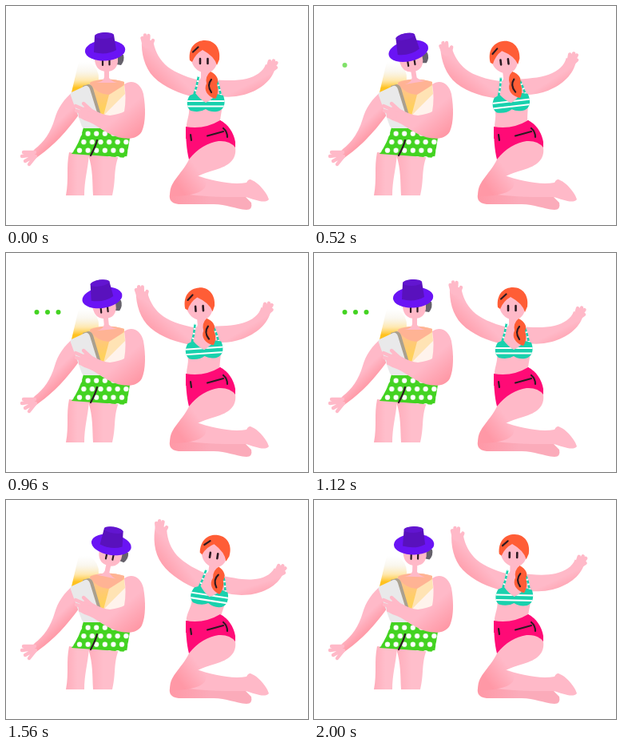
Recreate the animation shown at these times as an HTML page. Size 378 px wide and 274 px high, loop 2040 ms.

```html
<!DOCTYPE html>
<html lang="en">
<head>
<meta charset="utf-8">
<title>Beach dance</title>
<style>
  html, body { margin: 0; width: 100%; height: 100%; overflow: hidden; background: #fff; }
  svg { display: block; width: 378px; height: 274px; }
  .line { fill: none; stroke: #2b1a22; stroke-width: 2.2; stroke-linecap: round; stroke-linejoin: round; }
  .finger { fill: none; stroke: #ffb9c8; stroke-width: 4.4; stroke-linecap: round; stroke-linejoin: round; }
  .skin { fill: #ffb9c8; }
</style>
</head>
<body>
<svg viewBox="0 0 378 274">
  <defs>
    <linearGradient id="downRight" x1="0" y1="0" x2="1" y2="1">
      <stop offset=".6" stop-color="#ffb9c8"/><stop offset="1" stop-color="#ff8f9c"/>
    </linearGradient>
    <linearGradient id="downLeft" x1="1" y1="0" x2="0" y2="1">
      <stop offset=".5" stop-color="#ffb9c8"/><stop offset=".85" stop-color="#ff929f"/>
    </linearGradient>
    <linearGradient id="thigh" x1="1" y1="0" x2="0" y2=".6">
      <stop offset=".65" stop-color="#ffb9c8"/><stop offset="1" stop-color="#ff98a6"/>
    </linearGradient>
    <linearGradient id="arm" gradientUnits="userSpaceOnUse" x1="58" y1="135" x2="78" y2="156">
      <stop offset=".4" stop-color="#ffb9c8"/><stop offset="1" stop-color="#ff98a5"/>
    </linearGradient>
    <linearGradient id="leg">
      <stop offset="0" stop-color="#ffadbb"/><stop offset=".5" stop-color="#ffbecb"/>
    </linearGradient>
    <linearGradient id="shin">
      <stop offset="0" stop-color="#ff98a6"/><stop offset=".5" stop-color="#fbabba"/>
    </linearGradient>
    <linearGradient id="glow" x1="0" y1="1" x2="0" y2="0">
      <stop offset=".15" stop-color="#ffc21f"/><stop offset=".4" stop-color="#ffd878" stop-opacity=".6"/>
      <stop offset=".7" stop-color="#eee4c8" stop-opacity=".3"/><stop offset="1" stop-color="#eee8d8" stop-opacity="0"/>
    </linearGradient>
    <linearGradient id="chest" x1="0" y1="0" x2=".25" y2="1">
      <stop offset="0" stop-color="#ffb3a0"/><stop offset=".35" stop-color="#ffc488"/><stop offset=".85" stop-color="#ffd15c"/>
    </linearGradient>
    <pattern id="spots" width="10.6" height="21" patternUnits="userSpaceOnUse" patternTransform="translate(92 165)">
      <path fill="#43d321" d="M0 0h11v21H0z"/>
      <g fill="#fff"><circle cx="5.300" cy="5.200" r="3.100"/><circle cx="0" cy="15.700" r="3.100"/><circle cx="10.600" cy="15.700" r="3.100"/></g>
    </pattern>
    <clipPath id="top">
      <path d="M237 109Q243 117 250 121Q257 118 264 110L272 112C276 123 272 131 264 132Q256 133 250 129Q242 134 231 131C225 126 226 118 230 112Z"/>
    </clipPath>
  </defs>

  <g id="dots" fill="#43d321">
    <circle cx="38.5" cy="74" r="3"/><circle cx="52" cy="74" r="3"/><circle cx="65.5" cy="74" r="3"/>
  </g>

  <!-- man -->
  <path fill="url(#glow)" d="M91 70H105Q117 79 116 92L108 108H82Z"/>
  <path fill="url(#leg)" d="M79 183C75 203 79 215 75 237H98C98 219 102 206 104 186Z"/>
  <path fill="url(#leg)" d="M103 186C109 205 108 220 109 237H133C138 216 134 207 141 187Z"/>
  <path fill="#fff3ec" d="M108 95L148 96L152 138L118 155L92 140L88 110Z"/>
  <path fill="url(#chest)" d="M106 95Q126 88 148 95Q148 104 146 110L121 138H112L98 110Z"/>
  <path fill="#ffb394" d="M105 96Q126 88 148 95Q144 108 129 111Q113 110 105 96Z"/>
  <path fill="#ffe3b4" d="M129 111L148 99L149 110L122 137Z"/>
  <path fill="url(#arm)" d="M84 107C73 116 65 127 61 141C56 158 47 171 36 179L29 187L34 193L42 187C60 174 76 157 92 135L101 112Z"/>
  <path class="finger" d="M36 183L22 183M34 186L20 188M35 188L24 194M37 188L29 198"/>
  <path fill="url(#spots)" d="M97 152L118 153Q135 164 155 165L151 190Q126 188 82 185Q92 172 97 152Z"/>
  <path class="line" d="M114 168Q112 176 106 187"/>
  <path fill="#aaa08f" d="M96 100L103 98Q107 98 109 103L121 143Q122 150 115 152L104 152Z"/>
  <path fill="#e9e9ea" d="M82 108L99 100Q103 99 105 104L118 146Q119 152 113 153L98 153Q95 152 94 148L81 112Q80 109 82 108Z"/>
  <path fill="url(#downRight)" d="M148 98C158 91 169 97 172 110C175 127 175 146 170 157C164 168 149 167 137 163C121 157 113 148 101 144C93 142 89 136 91 132L98 126L110 130Q120 136 130 137Q143 135 148 132C150 121 150 109 148 98Z"/>
  <path class="finger" d="M108 132L97 122M101 131L87 125M100 135L88 131M101 139L93 138"/>

  <g id="manHead">
    <path class="skin" d="M123 79H129V90Q133 95 139 96H113Q122 95 123 89Z"/>
    <path fill="#65616b" d="M136 61L147 61Q149 68 144 74L138 73Z"/>
    <path class="skin" d="M111 61H140V70Q138 82 126 82Q113 82 111 68Z"/>
    <path class="line" d="M121 67V74M129.500 66V73.500"/>
    <ellipse cx="124" cy="55.500" rx="25.200" ry="13" fill="#6a14f4" transform="rotate(-3 124 55)"/>
    <path fill="#5911bd" d="M111 37Q123 30 135 36L138 55Q126 62 110 58Z"/>
    <ellipse cx="123" cy="37" rx="12" ry="4" fill="#6215d0" transform="rotate(-3 123 37)"/>
  </g>

  <!-- woman -->
  <path class="skin" d="M236 211C258 219 282 224 301 221Q304 215 308 218C316 221 327 234 329 242C324 248 311 242 300 239H220Z"/>
  <path fill="url(#shin)" d="M206 232Q240 240 300 239L307 246Q309 255 301 255C287 254 276 248 260 248H216C205 247 203 240 206 232Z"/>
  <path fill="#ff0b76" d="M225 151Q248 155 268 143C278 148 285 158 287 170L287 180L229 192C226 180 225 165 225 151Z"/>
  <path fill="url(#thigh)" d="M229 192C240 178 253 171 266 169Q280 168 287 177C289 192 279 200 262 205Q248 209 240 213L250 218C254 230 240 238 206 238C202 222 220 211 229 192Z"/>
  <g id="womanBody">
    <path fill="url(#downLeft)" d="M242 93C222 88 207 81 199 73C190 64 186 54 184 43L170 43C169 58 173 77 185 89C198 102 218 110 236 114Z"/>
    <path class="finger" d="M173 49L170.500 40M174 47L174 36.500M178 47L178.500 37M181 51L184 43M176 51H181"/>
    <path fill="url(#downRight)" d="M255 92C274 93 288 94 301 91C313 88 322 82 325 73L337 78C332 95 316 106 298 111Q283 115 268 113Z"/>
    <path class="finger" d="M327 79L330 69M329 80L335 68.500M332 80L338.500 71M331 82L338 77"/>
    <path class="skin" d="M244 78H255V89Q260 92 264 94L271 113C272 130 267 139 268 150Q246 160 226 154C225 145 230 137 229 129L231 112L239 94Q245 92 244 87Z"/>
    <path fill="none" stroke="#19d1ad" stroke-width="2.600" d="M235 112Q239 101 241 88M269 112Q267 101 263 91"/>
    <path fill="none" stroke="#fff" stroke-width="2.600" stroke-dasharray="2 4" d="M235 112Q239 101 241 88M269 112Q267 101 263 91"/>
    <g clip-path="url(#top)">
      <path fill="#19d1ad" d="M220 105H280V138H220Z"/>
      <path stroke="#fff" stroke-width="2" d="M220 119H280M220 125.500H280"/>
    </g>
    <path class="skin" d="M231 63Q234 53 248 52Q264 54 265 67Q263 83 249 84Q233 81 231 63Z"/>
    <path fill="#ff5d36" d="M230 68C228 51 238 43 249 43C262 43 269 54 267 67L264 74Q261 63 246 55Q237 60 233 70Z"/>
    <path fill="#ff5d36" d="M256 82C264 86 267 92 264 98C267 106 264 114 262 116C252 113 247 105 251 97Q249 88 256 82Z"/>
    <path class="line" d="M234 57.500L240.500 51.500M257 92Q251 99 257 108"/>
    <path class="line" d="M243 66V72M252.500 66V72" style="stroke-width:2.600"/>
  </g>
  <path fill="#ff0b76" d="M225 151Q248 155 268 143L276 149L272 158L240 166L225 166Z"/>
  <path class="line" d="M231 161L232 168M252 162.500L272 157M272 153Q277 157 277 164"/>
</svg>
<script>
  const LOOP = 2040;
  // [time, sideways reach of the head]
  const sway = [[0, 0], [520, -9.4], [800, -10.2], [1120, 0], [1400, 10.2], [1560, 12.5], [1760, 8.5], [2000, 1.8]];
  const get = id => document.getElementById(id);
  const man = get('manHead'), woman = get('womanBody'), dots = [...get('dots').children];
  const clamp = v => Math.max(0, Math.min(1, v));

  function key(i) {
    const n = sway.length, turn = Math.floor(i / n), [t, v] = sway[i - turn * n];
    return [t + turn * LOOP, v];
  }

  // Cubic curve through the keys, continuous over the loop
  function swayAt(t) {
    let i = sway.length - 1;
    while (sway[i][0] > t) i--;
    const [p, a, b, n] = [i - 1, i, i + 1, i + 2].map(key);
    const span = b[0] - a[0], u = (t - a[0]) / span;
    const slope = (c, d) => (d[1] - c[1]) / (d[0] - c[0]) * span;
    const w = 1 - u;
    return a[1] * (1 + 2 * u) * w * w + b[1] * (3 - 2 * u) * u * u
      + slope(p, b) * u * w * w - slope(a, n) * u * u * w;
  }

  function draw(t) {
    const angle = swayAt(t) * 0.7;
    woman.setAttribute('transform', `rotate(${angle} 251 150)`);
    man.setAttribute('transform', `rotate(${angle * 1.4} 126 92)`);
    const fadeOut = 1 - clamp((t - 1320) / 160);
    dots.forEach((dot, i) => dot.setAttribute('opacity', clamp((t - 440 - i * 200) / 120) * fadeOut));
  }

  const start = performance.now();
  function frame() {
    draw((performance.now() - start) % LOOP);
    requestAnimationFrame(frame);
  }
  frame();
</script>
</body>
</html>
```
